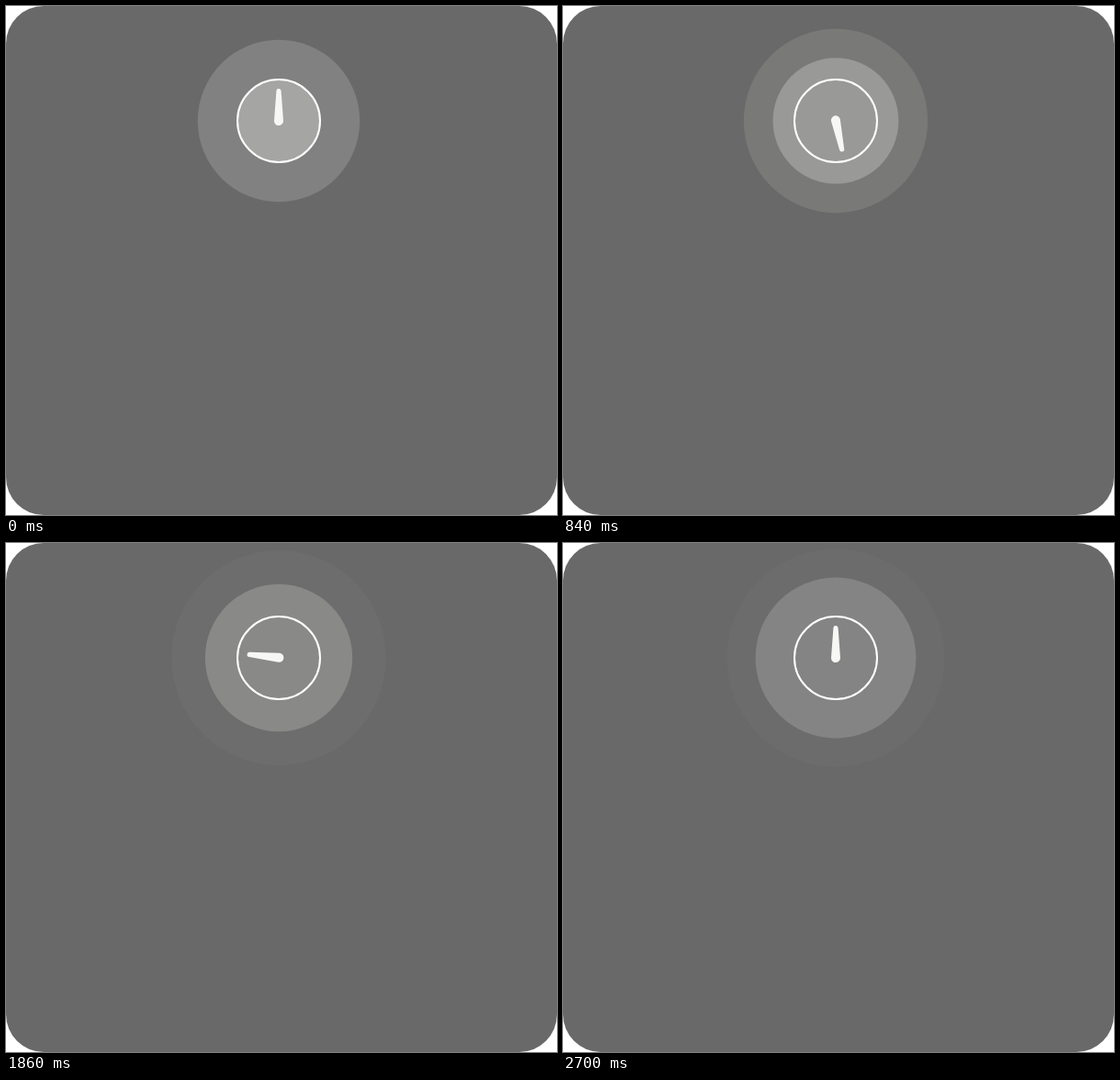
Animation of 600x554 px, one loop 2.76 s. Source, as an HTML page with a canvas:

```html
<!DOCTYPE html>
<html lang="en">
<head>
<meta charset="utf-8">
<title>Pulsing dial</title>
<style>
  html, body { margin: 0; width: 100%; height: 100%; overflow: hidden; background: #fff; }
  canvas { display: block; }
</style>
</head>
<body>
<canvas id="stage" width="600" height="554"></canvas>
<script>
const ctx = document.getElementById('stage').getContext('2d');
const LOOP = 2760, STEP = 60;
const CX = 297, CY = 125;
const BIRTHS = [-578, 0, 652, 1456, 2140];

function disc(x, y, r) {
  ctx.beginPath();
  ctx.arc(x, y, r, 0, Math.PI * 2);
}

// Quick burst out of the dial, then steady growth up to the full size.
const pulseRadius = age => Math.min(119, 62 + 0.0455 * age - 17 * Math.exp(-age / 90));
const pulseAlpha = age => Math.max(0.02, 0.29 * (1 - age / 1320));

// The needle sweeps the first half turn twice as fast as the second.
const needleDegrees = t => t < 900 ? t * 0.2 : 180 + (t - 900) * 0.1;

function drawPulses(t) {
  const alive = BIRTHS.filter(birth => birth <= t).slice(-2);
  for (const birth of alive) {
    const age = t - birth;
    ctx.fillStyle = `rgba(250, 250, 246, ${pulseAlpha(age)})`;
    disc(CX, CY, pulseRadius(age));
    ctx.fill();
  }
}

function drawNeedle(t) {
  const base = 5, tip = 2.6, length = 32.4;
  const lean = Math.asin((base - tip) / length);
  ctx.save();
  ctx.translate(CX, CY - 0.3);
  ctx.rotate(needleDegrees(t) * Math.PI / 180);
  ctx.translate(0, 0.4);
  ctx.beginPath();
  ctx.arc(0, 0, base, -lean, Math.PI + lean);
  ctx.arc(0, -length, tip, Math.PI + lean, -lean);
  ctx.closePath();
  ctx.fillStyle = '#f7f7f5';
  ctx.fill();
  ctx.restore();
}

function draw(t) {
  ctx.clearRect(0, 0, 600, 554);
  ctx.fillStyle = '#696969';
  ctx.beginPath();
  ctx.roundRect(0, 0, 600, 554, 41);
  ctx.fill();

  drawPulses(t);

  ctx.strokeStyle = '#fff';
  ctx.lineWidth = 2;
  disc(CX, CY, 45);
  ctx.stroke();

  drawNeedle(t);
}

const start = performance.now();
function tick() {
  const t = (performance.now() - start) % LOOP;
  draw(Math.floor(t / STEP) * STEP);
  requestAnimationFrame(tick);
}
tick();
</script>
</body>
</html>
```
